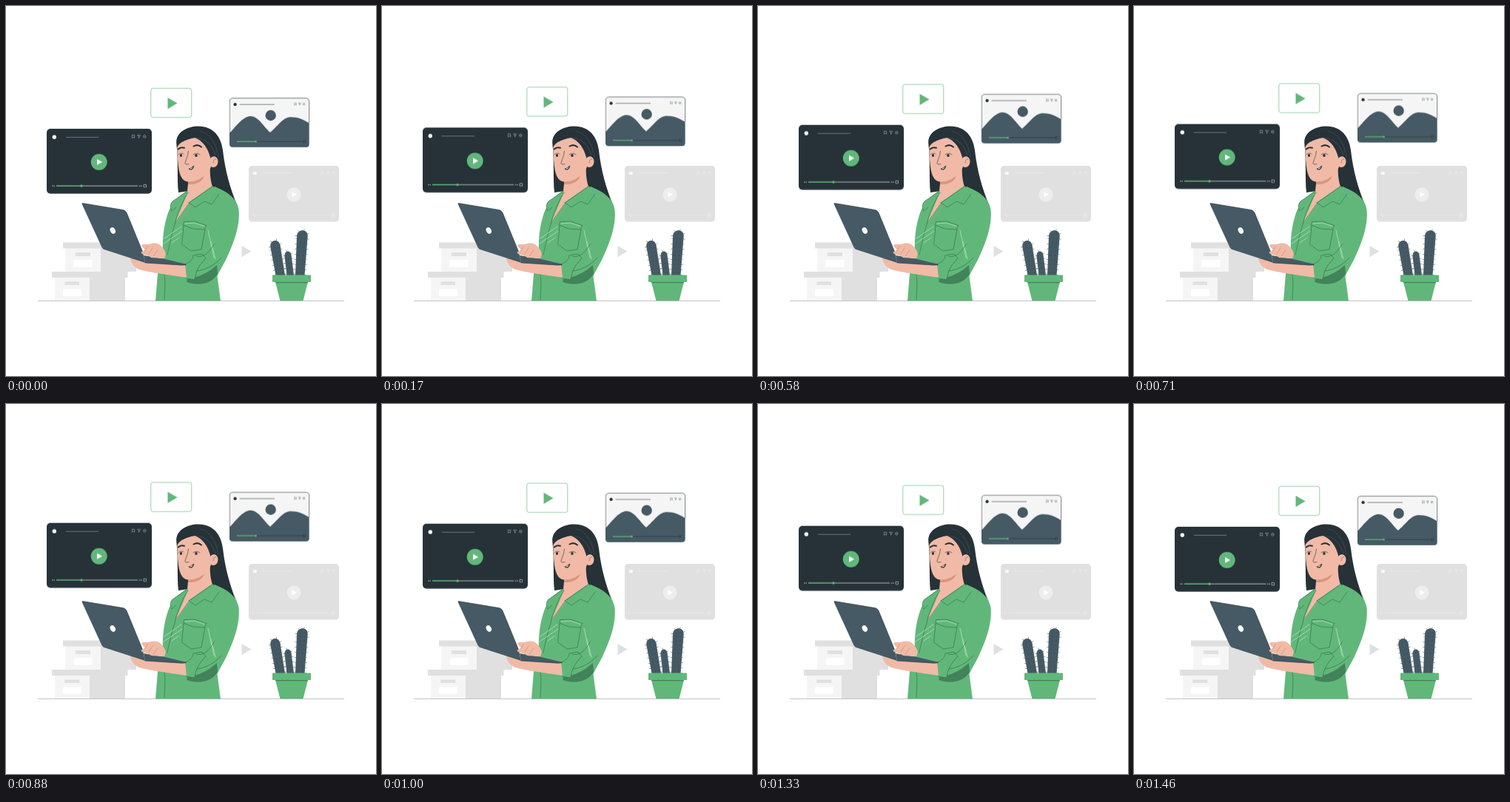
An HTML page for the animation above (1500 ms loop, 500x500 px).

```html
<!DOCTYPE html>
<html lang="en">
<head>
<meta charset="utf-8">
<title>Video panels</title>
<style>
  html, body { margin: 0; width: 100%; height: 100%; overflow: hidden; background: #fff; }
  svg { display: block; width: 100vw; height: 100vh; }
  .float { animation: float 1.5s linear -20ms infinite; }
  @keyframes float { 50% { transform: translateY(-6.67px); } }
  .green { fill: #61b77a; }
  .shade { fill: #42835a; }
  .dark { fill: #263238; }
  .slate { fill: #455a64; }
  .skin { fill: #f0baa6; }
  .grey { fill: #e0e0e0; }
  .pale { fill: #f5f5f5; }
  .white { fill: #fff; }
  .line { fill: none; stroke: #263238; stroke-width: .6; stroke-linecap: round; stroke-linejoin: round; }
  .seam { fill: none; stroke: #2f6845; stroke-width: .6; stroke-linecap: round; stroke-linejoin: round; }
  .light { fill: none; stroke: #b5dfc1; stroke-width: .8; stroke-linecap: round; }
  .spines { fill: none; stroke: #455a64; stroke-width: 4.5; stroke-dasharray: .45 6.5; }
  .dots { fill: none; stroke: #263238; stroke-width: .7; stroke-dasharray: .8 5; }
</style>
</head>
<body>
<svg viewBox="0 0 500 500">
  <defs>
    <path id="icons" fill="none" stroke="currentColor" stroke-width=".55"
      d="M-9.200-2h3.400v4l-1.700-1.300-1.700 1.300zM-2-1.900h4L.2 2l-.6-2.400zM6 0a1.800 1.800 0 1 0 3.600 0 1.800 1.800 0 1 0-3.600 0M7 0h1.600"/>
    <path id="play" d="M0 0 13 7.600 0 15.200z"/>
    <path id="left-cactus" d="M357.400 326C355.500 315.500 368.500 313.500 370.500 323L377 364H364.500z"/>
    <path id="mid-cactus" d="M376.500 338C376 330 384.500 329.500 385.500 336L389 364H379.500z"/>
    <path id="right-cactus" d="M393 311C393.500 300.500 408.200 300.500 407.700 311L403.500 364H391z"/>
  </defs>

  <!-- storage boxes -->
  <g>
    <path class="pale" d="M80 327h48v32H80zM66 367h47v31H66z"/>
    <path class="grey" d="M77 319.500h99v8H77zM128 327h48v32h-48zM62 359h102.500v8H62zM113 367h48v31h-48zM94 333h20v5H94zM79.500 372.500h19.500v4.500h-19.500z"/>
    <path class="white" d="M91.500 343h25v10h-25zM77 382.500h25v9.500H77z"/>
  </g>

  <!-- still panel -->
  <g>
    <rect class="grey" x="328" y="216" width="122" height="75.500" rx="4.500"/>
    <circle class="white" cx="336.500" cy="226" r="2.300"/>
    <path d="M347 225.500h39M339 282.500h95" stroke="#eee" stroke-width=".7"/>
    <path d="M333.500 282.500h3M435.500 282.500h3M440.500 281h3.500v3h-3.500z" fill="none" stroke="#f0f0f0" stroke-width=".7"/>
    <use href="#icons" x="435" y="225.300" color="#eee"/>
    <circle cx="389" cy="254.700" r="9.500" fill="#eee"/>
    <path class="white" d="M386.500 251 392.800 254.700 386.500 258.400z"/>
  </g>
  <use class="grey" href="#play" x="318.500" y="324"/>

  <!-- cactus -->
  <g>
    <g class="spines">
      <use href="#left-cactus"/><use href="#mid-cactus"/><use href="#right-cactus"/>
    </g>
    <g class="slate">
      <use href="#left-cactus"/><use href="#mid-cactus"/><use href="#right-cactus"/>
    </g>
    <path class="dots" d="M362 321 369 362M366 320 374 362M381 336 384 362M398 308 395 362M404 308 400 362"/>
    <path class="green" d="M360 363.500h52v9.500h-52zM364 373h44l-6.500 25.500h-31z"/>
    <path class="shade" d="M364 373h44l-.4 1.200h-43.200z"/>
  </g>

  <path d="M43 398.500h414" stroke="#a5abae" stroke-width=".7"/>

  <!-- woman -->
  <g>
    <path class="dark" d="M230.300 186C229 170 246 162.500 260 162.600 281 163 290.500 177 293 195 296 222 303 247 312 268L282 262 247 250 233 252C231 235 233 212 230.300 186z"/>
    <path class="skin" d="M247 230 276 215C275 228 277 238 279 244L261 265 231 292C224 290 236 262 245 250z"/>
    <path d="M246 236.500C256 236.500 264 231 268 226 269 235 259 242 246 241z" fill="#d9957f"/>
    <path class="skin" d="M231.300 193C231.500 184 246 180 255 178 266 182 273 192 276.500 206 279 201 286.500 203 286.500 210 286.500 217 281 219.500 277 217 274 226 262 237.500 247 237.500 240 237.500 236 232 234 223 232 212 231.500 201 231.300 193z"/>
    <path class="line" d="M280 212C280 208 282 206 284 207" stroke-opacity=".6"/>
    <path d="M256 178C270 179 279 188 283 202M262 169C276 172 284 186 287 204" fill="none" stroke="#526168" stroke-width=".5"/>
    <path d="M232.700 193.500C235 191.200 238 190.800 241 191.800M253.500 189.500C257 187.500 261 188 264 190.500" fill="none" stroke="#263238" stroke-width="2" stroke-linecap="round"/>
    <ellipse class="dark" cx="236.500" cy="202" rx="1.600" ry="2"/>
    <ellipse class="dark" cx="257" cy="202" rx="1.700" ry="2"/>
    <path class="line" d="M233 201C235 198.500 238 198.500 240 200M253 201C256 198.500 259 198.800 262 201"/>
    <path class="line" d="M246.500 196C246 203 243 208 241.800 212.500 243 214.300 245 214.300 247 213.500" stroke-width=".8"/>
    <path class="dark" d="M246.500 219.500C249 219.500 251.500 218 254 215.300 254.300 219.500 251.500 222.500 248 221.300z"/>
    <path class="white" d="M248.500 219.800 252.500 217.800 251.500 219.600 248.800 220.600z"/>

    <!-- shirt -->
    <path class="green" d="M245 250C238 262 233 278 229 293L247 268 282 244C301 252 312 260 314.500 275 317 298 306 324 298 341 293 351 288 359 285.500 365L290 398.500H202L205 362 212 334C211 312 214 295 218.500 281 222 268 236 256 245 250z"/>
    <path class="shade" d="M245 369C260 367 274 360 285 350L286 362C277 377 259 378 244 373z"/>
    <path class="green" d="M244 250 225 264C221 268 222 273 224 277L230 272 229 291 238 271 246 251zM279 243 246 266 256 274 268 264 279 268 289 253z"/>
    <path class="seam" d="M245 250 225 264C221 268 222 273 224 277L230 272M246 252C237 266 232 280 228.500 293M279 244 247 266 256 272 268 264 278 268 288 254M247 267 229 292C223 312 220 326 218 336"/>
    <path class="seam" d="M241 291.500 255 291 271 296.500 268 302 252 301 240 296zM240 297 237.500 322 250 331 264 329 269 302"/>
    <path class="light" d="M214 314 237 298M213 321 238 304M224 320 234 313M273 303 281 340M277 318 283 342M242 294 254 293 268 297.500"/>
    <path class="green" d="M242 349C249 346 253 342 253 337L265 335 270 341C261 350 256 359 255 370L243 368z"/>
    <path class="seam" d="M242 349C249 346 253 342 253 337L265 335 270 341C261 350 256 359 255 370L243 368M281 322C275 333 266 341 257 338M291 340C282 351 268 357 258 358M214 363C216 374 214 386 214 397"/>

    <!-- laptop and hands -->
    <path class="skin" d="M168 340C177 342 200 344 242 349L244 367C218 363 193 360 180 356 173 353 169 348 168 340z"/>
    <path class="slate" d="M103.500 266.500 158 275.500C161 276 162.500 278 163.500 280.500L185 333 188 347 132.500 329C130.500 328 129.500 326.500 128.500 324L103 268.500C102.500 267 102.500 266.500 103.500 266.500z"/>
    <path class="line" d="M103.500 266.500 158 275.500C161 276 162.500 278 163.500 280.500L185 333" stroke-width=".5"/>
    <path class="slate" d="M186 337 215 342 243 348.700C245 350.500 241 350.500 237 350.200L188 347z"/>
    <path class="line" d="M188 347 237 350.200 243 349.500"/>
    <path class="skin" d="M183 324C183.500 320.500 190 323 194 321.500 201 319 208 321 211 326 216 331 217 336 214 341L196 340C193 336 188 338 183 334 181.500 331 186 332 188 330z"/>
    <path d="M187 332 191 325M193 335 198 327M199 338 205 330" fill="none" stroke="#c6846f" stroke-width=".6" stroke-linecap="round"/>
    <ellipse class="white" cx="144.300" cy="303.500" rx="3.300" ry="4.500" transform="rotate(-30 144.300 303.500)"/>
  </g>

  <!-- floating panels -->
  <g class="float">
    <rect class="dark" x="55" y="166" width="142" height="87.700" rx="5"/>
    <circle class="white" cx="65.300" cy="177.300" r="2.700"/>
    <path d="M81 177.500h44" stroke="#9aa2a6" stroke-width=".6"/>
    <use href="#icons" x="179.500" y="176.500" color="#b5bbbe"/>
    <circle class="green" cx="125.700" cy="211" r="11"/>
    <path class="white" d="M123 206.900 130.200 211 123 215.100z"/>
    <path d="M102 243.200h76" stroke="#d5d8da" stroke-width=".8"/>
    <path d="M68 243.200h34" stroke="#61b77a" stroke-width="1.400"/>
    <circle class="green" cx="102" cy="243.200" r="1.700"/>
    <path d="M62 243.200h1.700m.6 0h1.700M179.500 243.200h1.700m.6 0h2" stroke="#aeb5b8" stroke-width="1.100"/>
    <path d="M186 241.500h3.500v3.400H186z" fill="none" stroke="#d5d8da" stroke-width=".6"/>

    <rect x="195.800" y="111.300" width="55" height="39.400" rx="3" fill="#fff" stroke="#61b77a" stroke-width=".65"/>
    <use class="green" href="#play" x="218.500" y="124"/>

    <rect class="pale" x="302.300" y="124.700" width="107.400" height="66.300" rx="4.500"/>
    <path class="slate" d="M302 172C310 164 319 150 330 149 341 149 348 163 357 171 366 164 374 150.500 384 150.300 394 150 402 153.500 409.700 158.500V187Q409.700 191 405.500 191H306.500Q302 191 302 187z"/>
    <circle class="slate" cx="357.700" cy="148" r="7.200"/>
    <path class="line" d="M302.300 172V129.200Q302.300 124.700 306.800 124.700H405.200Q409.700 124.700 409.700 129.200V158"/>
    <circle class="dark" cx="309.600" cy="133.200" r="2.100"/>
    <path class="line" d="M316 133.200h46.500" stroke-width=".5"/>
    <use href="#icons" transform="translate(396.700 132.700) scale(.76)" color="#4b555a"/>
    <path class="line" d="M338 183.300h62M402 182h2.800v2.700H402z" stroke-width=".5"/>
    <path d="M312 183.300h25.500" stroke="#61b77a" stroke-width="1.200"/>
    <circle class="green" cx="337.500" cy="183.300" r="1.400"/>
  </g>
</svg>
</body>
</html>
```
